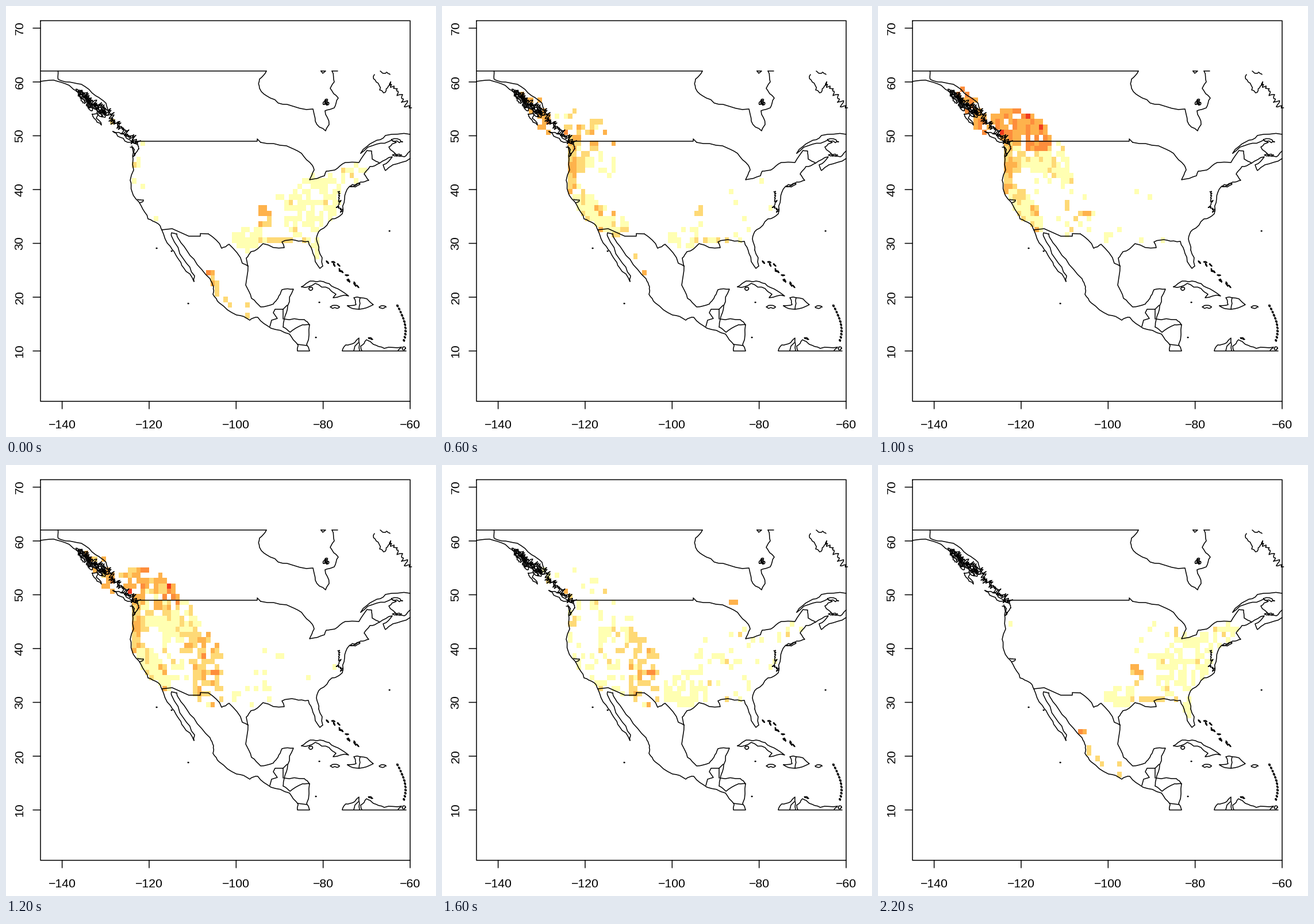
A matplotlib script for the animation above (2.4 s loop, 748x749 px).

```python
import numpy as np
import matplotlib.pyplot as plt
from matplotlib.animation import FuncAnimation
from matplotlib.colors import ListedColormap
from matplotlib.path import Path

W, H = 748, 749
FRAMES, INTERVAL = 12, 200
COLORS = ["#ffffff", "#ffffb2", "#fed976", "#feb24c", "#fd8d3c", "#f03b20"]
rng = np.random.RandomState(11)


def px(lon):
    return 703 + (lon + 60) * 7.567


def py(lat):
    return 599.5 - (lat - 10) * 9.35


fig = plt.figure(figsize=(W / 100, H / 100), dpi=100, facecolor="white")
ax = fig.add_axes([0, 0, 1, 1])
ax.axis("off")


def line(pts, rough=0.0, close=False, depth=2):
    """Draw a polyline; rough > 0 adds fractal wiggle between the points."""
    p = np.array(pts, float).reshape(-1, 2)
    if close:
        p = np.vstack([p, p[:1]])
    for _ in range(depth if rough else 0):
        d = np.diff(p, axis=0)
        side = np.c_[-d[:, 1], d[:, 0]] * rng.uniform(-rough, rough, (len(d), 1))
        q = np.empty((2 * len(p) - 1, 2))
        q[::2], q[1::2] = p, p[:-1] + d / 2 + side
        p = q
    ax.plot(p[:, 0], p[:, 1], color="black", lw=1.1, zorder=3, snap=False,
            solid_joinstyle="round", solid_capstyle="round")


def isle(x, y, rx, ry, tilt=0):
    a = np.arange(6) * np.pi / 3
    c, s = np.cos(np.radians(tilt)), np.sin(np.radians(tilt))
    u, v = rx * np.cos(a), ry * np.sin(a)
    line(np.c_[x + c * u - s * v, y + s * u + c * v], 0.3, True, 1)


def along(pts, n):
    """n evenly spaced points on a polyline."""
    p = np.array(pts, float).reshape(-1, 2)
    t = np.r_[0, np.cumsum(np.hypot(*np.diff(p, axis=0).T))]
    s = np.linspace(0, t[-1], n)
    return np.c_[np.interp(s, t, p[:, 0]), np.interp(s, t, p[:, 1])]


def fjords(pts, n, reach):
    """A coast cut by narrow inlets on both sides."""
    amp = rng.uniform(-reach, reach, n)
    amp[::2] *= 0.25
    line(along(pts, n) + np.c_[amp, -0.8 * amp], 0.15, depth=1)


# --- mainland coast, key points in stage pixels ---
PACIFIC = [219, 243, 221, 266, 216, 303, 219, 322, 235, 347, 247, 370, 264, 378,
           271, 389]
BAJA = [271, 389, 286, 418, 298, 437, 309, 455, 327, 479, 328, 469, 309, 440,
        288, 400, 288, 394, 297, 396]
MEXICO = [297, 396, 304, 411, 327, 440, 355, 474, 361, 488, 360, 501, 371, 516,
          401, 537, 424, 546, 438, 541, 461, 560, 493, 570, 508, 589, 507, 599]
CARIB = [528, 599, 523, 588, 528, 554, 519, 545, 484, 544, 490, 521, 500, 492,
         480, 493, 473, 508, 465, 518, 443, 523, 427, 508, 417, 485, 421, 452]
GULF = [421, 452, 418, 438, 426, 427, 447, 413, 484, 420, 480, 410, 503, 407,
        526, 409, 534, 430, 546, 456, 551, 452, 544, 424]
ATLANTIC = [544, 424, 540, 405, 547, 389, 567, 370, 585, 361, 589, 335, 597, 314,
            617, 306, 631, 303, 623, 292, 633, 279, 650, 273, 672, 262, 656, 276,
            660, 286, 673, 276, 703, 265]
COASTS = [PACIFIC, BAJA, MEXICO, CARIB, GULF, ATLANTIC]
for coast in COASTS:
    line(coast, 0.1)

# north and Hudson Bay
line([60, 113, 453, 113])
line([90.5, 113, 90.5, 127, 104, 132, 131, 136, 156, 156, 174, 169, 177, 179], 0.06)
line([60, 131, 90, 131, 110, 138, 126, 151], 0.1)
line([453, 113, 441, 127, 441, 143, 460, 160, 489, 171, 534, 179, 538, 200, 556, 217,
      562, 206, 555, 182, 571, 177, 578, 160, 564, 143, 571, 132, 567, 113], 0.12)
line([548, 113, 551, 117, 556, 113, 548, 113])
line([567, 113, 577, 113])
line([641, 119, 644, 132, 650, 146, 657, 151, 664, 142, 669, 132], 0.25)
fjords([669, 132, 683, 150, 694, 167, 703, 179], 26, 5)
line([651, 113, 656, 117, 662, 115, 668, 119], 0.2)
for _ in range(5):
    isle(rng.uniform(553, 560), rng.uniform(163, 170), 3, 2, rng.uniform(0, 180))

# fjord coast, archipelago and sound
for reach in (5, 7):
    fjords([126, 150, 152, 166, 177, 185, 194, 206, 229, 238], 90, reach)
for x, y in along([128, 152, 148, 172, 172, 186], 24):
    isle(x + rng.uniform(-3, 3), y + rng.uniform(-5, 7), rng.uniform(4, 7),
         rng.uniform(1.5, 3), 50)
line([150, 188, 160, 188, 157, 195, 166, 207, 153, 195], 0.15, True)
line([186, 218, 206, 223, 228, 240, 212, 237, 194, 226], 0.2, True)
fjords([229, 236, 231, 247, 223, 261, 222, 249, 219, 243], 24, 3)
line([229, 336, 239, 337, 233, 342], 0.2)

# land borders
line([226, 235, 437, 235, 437, 231, 443, 237])
line([443, 237, 488, 243, 514, 256, 533, 277, 536, 285, 528, 302, 554, 295, 557, 287,
      572, 285, 590, 272, 614, 272, 628, 251, 636, 252, 637, 266, 650, 273], 0.05)
line([271, 389, 289, 387, 318, 400, 338, 400, 338, 395.5, 352, 396])
line([352, 396, 375, 421, 388, 414, 411, 447, 421, 452], 0.1)
line([459, 557, 462, 546, 472, 543, 465, 533, 468, 527, 482, 527, 482, 544])
line([482, 527, 489, 520])
line([484, 544, 482, 558, 494, 567, 516, 554, 528, 554], 0.08)
line([507, 588, 523, 590])
line([507, 599.5, 528, 599.5])

# gulf of St Lawrence
line([617, 256, 640, 236, 660, 225, 703, 223], 0.1)
line([617, 256, 645, 240, 671, 233, 679, 237, 666, 245, 679, 261, 693, 262, 703, 252],
     0.12)
isle(680, 234, 10, 3, 12)
isle(680, 259, 8, 2)
isle(607, 311, 9, 2, -12)
fjords([577, 323, 580, 335, 578, 347, 582, 360], 24, 5)

# islands
line([514, 488, 529, 478, 552, 479, 571, 489, 596, 504, 569, 507, 574, 501, 562, 491,
      538, 482], 0.12, True)
line([594, 521, 614, 527, 639, 519, 628, 509, 605, 507, 609, 519], 0.12, True)
line([616, 507, 614, 527], 0.1)
isle(572, 523, 8, 3)
isle(655, 523, 6, 2)
isle(530, 491, 3.5, 3)
for k in np.linspace(0, 1, 12):
    isle(681 + 14 * np.sin(2.2 * k), 521 + 60 * k, 1.8, 1.2, 60)
for x, y in along([562, 442, 575, 447, 592, 470, 612, 489], 13):
    isle(x + rng.uniform(-5, 3), y + rng.uniform(-3, 5), 3, 0.8, rng.uniform(0, 80))
for x, y in [(667, 391), (262, 421), (317, 517), (539, 576), (545, 515), (288, 426)]:
    isle(x, y, 0.8, 0.6)

# southern edge
line([585, 599, 591, 589, 605, 586, 614, 577, 615, 599], 0.1)
line([619, 599, 617, 591, 627, 580, 639, 588, 658, 595, 688, 593, 682, 599], 0.1)
line([605, 599, 607, 591, 613, 585])
line([585, 599.5, 696, 599.5])
isle(634, 578, 4, 1, 20)
isle(692, 595, 3, 3)

# --- density cells, one degree each ---
glon, glat = np.meshgrid(np.arange(-140, -60) + 0.5, np.arange(10, 62) + 0.5)
keep, shade = rng.rand(2, *glon.shape)
shore = [60, 131, 122, 150, 150, 205, 185, 222, 222, 240]
mainland = np.array(shore + sum(COASTS, []) + [703, 113, 60, 113]).reshape(-1, 2)
land = Path(mainland).contains_points(
    np.c_[px(glon).ravel(), py(glat).ravel()]).reshape(glon.shape)

# lon, lat, rx, ry, tilt | peak step, spread | density, heat
WINTER = [
    (-82.5, 37, 7.5, 5, 35, 11.6, 1.8, .62, .8),       # east
    (-90, 30.5, 7, .8, 0, 0, 2.5, .95, 1.7),           # gulf shore
    (-97, 30.7, 4, 2.4, 0, .5, 2, .85, .9),            # Texas
    (-93.5, 35, 1.8, 2, 0, 0, 1.8, .85, 2.4),          # Arkansas
    (-81.5, 28, 2, 3, -30, 11, 1.5, .7, .8),           # Florida
    (-76, 41, 6.5, 2.5, 25, 10.3, 1.6, .5, .8),        # northeast
    (-105, 21.5, 1.3, 3.5, 20, 0, 1.7, .75, 2.2),      # west Mexico
    (-100, 18.3, 3.5, 2, -20, 11.5, 1.6, .35, 2.4),    # south Mexico
    (-105.5, 24, 1.6, 1.2, 0, 0, 3, .6, 3.4),          # Durango
]
SPRING = [
    (-110, 28, 2.5, 1.2, 0, 1.8, .9, .7, 3),           # Sonora
    (-116, 34.3, 6.5, 2.4, -15, 2.6, .9, .9, 1.1),     # desert
    (-119, 36.3, 5.5, 2.3, -50, 4.7, 2.2, 1.2, 1.2),   # California
    (-123.3, 44.5, 1.9, 5.3, 0, 4.5, 2.2, 1.5, 2.8),   # Pacific shore
    (-120.5, 46.5, 2.6, 3.2, 0, 4.2, 1.8, .85, 1.6),   # Cascades
    (-121, 49.7, 4.2, 2, -10, 4.5, 1.8, .85, 3),       # Fraser
    (-131, 54.5, 6.5, 1.7, -50, 4.4, 1.7, .65, 3.5),   # north shore
]
SUMMER = [
    (-120, 51.2, 7.5, 3.2, -20, 5, 1.3, .85, 3.4),     # interior
    (-116.5, 46.7, 6, 3.7, -25, 5.5, 1.5, .85, 1.3),   # Columbia
    (-112, 44.5, 5, 3.5, -55, 6, 1.1, .75, 1.3),       # north Rockies
    (-107.5, 37.5, 6.7, 4.3, -70, 6.8, 1.1, .85, 2.5),  # Rockies
    (-113, 39.5, 5, 5.5, 0, 7, .8, .6, 1.6),           # Great Basin
]
AUTUMN = [
    (-106.5, 32, 4, 2.8, -20, 7, .8, .85, 2.8),        # New Mexico
    (-97, 32, 5.5, 3.7, 0, 7.8, 1, .7, .8),            # plains
    (-109, 34, 6, 3, 0, 8.7, .8, .4, 1),               # southwest
    (-86, 38, 10, 6, 0, 8, 1.2, .15, .8),              # scattered east
    (-88, 41.5, 5, 4, 0, 10, 1.3, .3, .8),             # midwest
    (-86.2, 48.5, 1.2, .6, 0, 8, .8, 1, 3.5),          # Lake Superior
]


def cells(step):
    """Each region swells and fades around its own time of the loop."""
    z = np.zeros(glon.shape, int)
    for lon, lat, rx, ry, tilt, peak, spread, dens, heat in (
            WINTER + SPRING + SUMMER + AUTUMN):
        dt = (step - peak + FRAMES / 2) % FRAMES - FRAMES / 2
        w = np.exp(-0.5 * (dt / spread) ** 2)
        c, s = np.cos(np.radians(tilt)), np.sin(np.radians(tilt))
        dx, dy = glon - lon, glat - lat
        r = ((c * dx + s * dy) / rx) ** 2 + ((c * dy - s * dx) / ry) ** 2
        tone = heat * w ** 0.4 + 1.4 * (shade - 0.5) + (shade > 0.95)
        tone = np.clip(np.rint(tone), 1, 5).astype(int)
        show = (r < 1) & land & (keep < dens * w) & (w > 0.03)
        z = np.where(show, np.maximum(z, tone), z)
    return z


image = ax.imshow(cells(0), cmap=ListedColormap(COLORS), vmin=-0.5, vmax=5.5,
                  origin="lower", extent=(px(-140), px(-60), py(10), py(62)),
                  interpolation="nearest", aspect="auto", zorder=1)

# --- frame, ticks and labels ---
line([60, 25.5, 703, 25.5, 703, 687, 60, 687], close=True)
font = dict(family="Liberation Sans", fontsize=15.3, ha="center", va="baseline")
for lon in range(-140, -59, 20):
    line([px(lon), 687, px(lon), 700])
    ax.text(px(lon), 734, f"\u2212{-lon}", **font)
for lat in range(10, 71, 10):
    line([60, py(lat), 47, py(lat)])
    ax.text(29.5, py(lat), str(lat), rotation=90, rotation_mode="anchor", **font)
ax.set_xlim(0, W)
ax.set_ylim(H, 0)


def update(i):
    image.set_data(cells(i))
    return [image]


anim = FuncAnimation(fig, update, frames=FRAMES, interval=INTERVAL, repeat=True,
                     repeat_delay=0)
plt.show()
```
